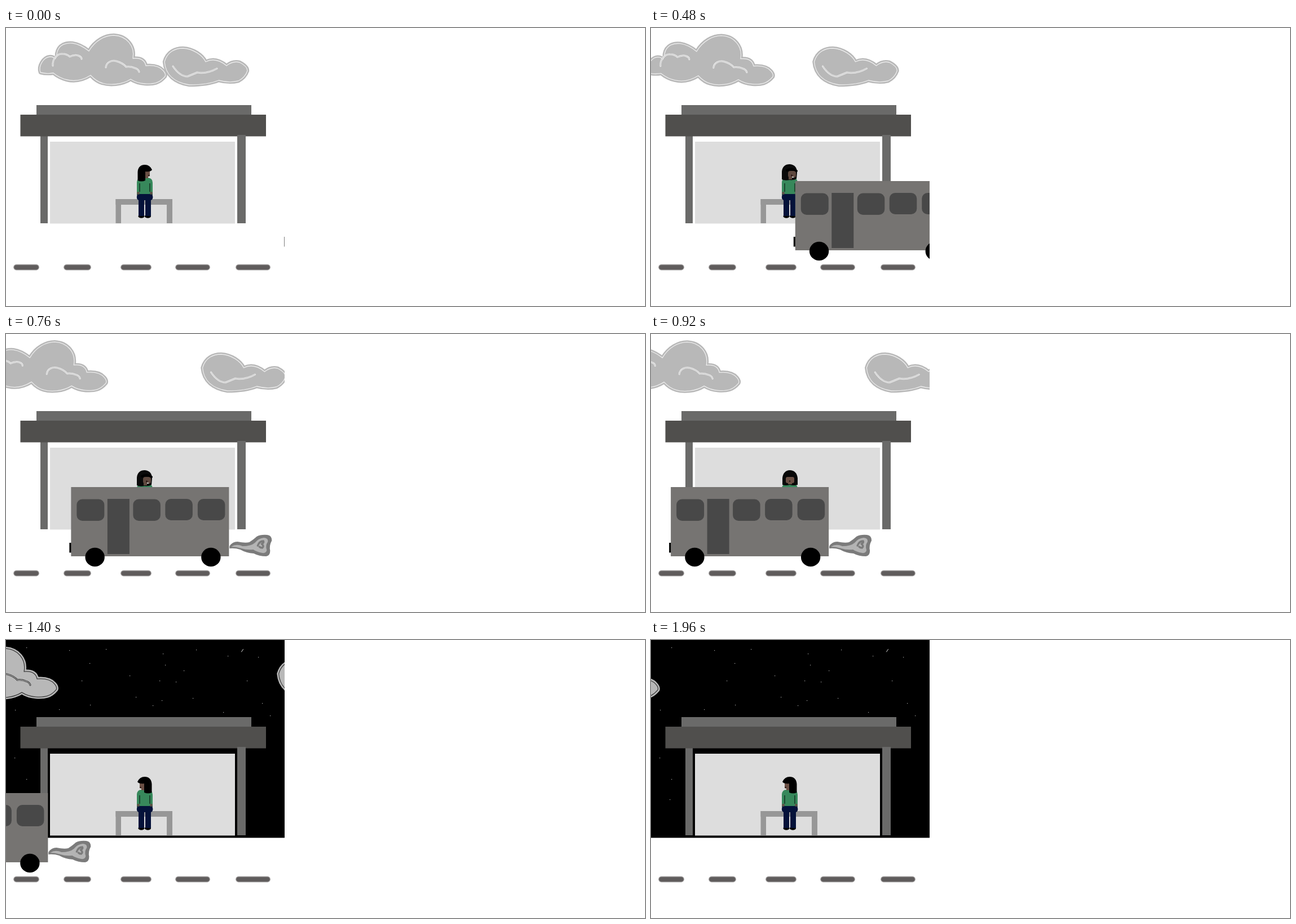
These frames come from a looping animation (1133 px wide and 494 px high, 2 s). An HTML page with a canvas:

```html
<!DOCTYPE html>
<html lang="en">
<head>
<meta charset="utf-8">
<title>Waiting at the bus stop</title>
<style>
html, body { margin: 0; width: 100%; height: 100%; overflow: hidden; background: #fff; }
canvas { display: block; width: 1133px; height: 494px; }
</style>
</head>
<body>
<canvas id="stage" width="1133" height="494"></canvas>
<script>
const ctx = document.getElementById('stage').getContext('2d');
const LOOP = 2000, STEP = 40, SCENE = 494;
const TURN = 440, NIGHT = 1320;

const path = d => new Path2D(d);

const cloudLeft = {
  edge: path('M61 79C57 68 66 52 78 51Q84 51 87 55Q91 50 90 46C93 28 108 26 118 27Q132 29 147 41C158 22 176 13 191 13C214 14 229 32 225 54Q245 52 248 67Q270 65 279 76Q284 82 282 86C272 98 262 100 246 99Q232 98 221 91C205 101 184 102 171 98Q160 95 150 84C134 94 120 95 108 92Q95 89 84 80Q72 82 61 79Z'),
  folds: path('M83 67C82 55 91 45 100 46Q108 46 113 51Q121 47 128 49Q134 51 134 55M177 70C178 60 188 57 196 59Q207 62 213 69Q221 68 228 71Q235 73 236 78')
};
const cloudRight = {
  edge: path('M281 60C286 42 300 36 314 36C332 37 348 48 354 60Q372 51 391 67Q402 58 414 61Q428 68 428 76Q424 88 412 94Q396 98 377 93Q358 101 325 101C300 97 283 84 281 60Z'),
  folds: path('M296 68Q308 86 322 86Q332 82 339 79Q356 82 374 72')
};

// Exhaust, relative to the left side of the bus
const smoke = {
  outer: path('M281 377Q286 369 295 369Q309 372 316 370Q325 364 329 360Q336 356 348 357Q356 358 356 367Q351 376 353 385Q353 394 346 395Q333 395 324 390Q310 389 300 383Q291 380 281 381Z'),
  inner: path('M284 378Q293 372 304 377Q319 377 326 371Q332 363 342 362Q350 363 349 369Q344 376 347 384Q346 390 339 389Q329 387 323 383Q311 384 302 381Q293 378 284 378Z'),
  curl: path('M331 376Q334 368 341 368Q342 371 338 373Q343 377 339 380Q336 380 334 378')
};

const body = {
  shirt: path('M232 297V274Q233 266 240 266H252Q260 267 260 275V297Z'),
  pants: path('M233 295H259Q261 300 260 303Q259 306 257 306V334H247V306H245V334H235V306Q231 304 232 299Z'),
  hair: path('M233.5 271V256C234 247 239 243 246 243Q255 243 259 252Q256 256 247 255V271Q240 274 233.5 271Z'),
  hairTurn: path('M232 269V255C233 246 238 242 246 242C255 243 259 248 259 257L258 268Q253 271 246 270Q237 272 232 269Z'),
  hairFront: path('M233 268V256C234 247 239 242 246 242C254 242 259 247 260 256V268Q253 270 246 268Q239 270 233 268Z')
};

const stars = [36,13, 112,18, 177,16, 148,41, 134,72, 219,63, 149,115, 94,123, 16,124, 230,101,
  260,116, 276,107, 272,72, 301,74, 282,44, 278,24, 337,17, 315,54, 331,103, 393,28,
  447,30, 427,72, 454,112, 468,134, 385,128, 15,209, 36,247, 33,283];
const dashes = [[13, 59], [102, 151], [203, 258], [300, 362], [407, 469]];

function fill(shape, color) {
  ctx.fillStyle = color;
  ctx.fill(shape);
}

function stroke(shape, color, width) {
  ctx.strokeStyle = color;
  ctx.lineWidth = width;
  ctx.stroke(shape);
}

function box(x0, y0, x1, y1, color, radius = 0) {
  ctx.fillStyle = color;
  ctx.beginPath();
  ctx.roundRect(x0, y0, x1 - x0, y1 - y0, radius);
  ctx.fill();
}

function oval(x, y, rx, ry, color) {
  ctx.fillStyle = color;
  ctx.beginPath();
  ctx.ellipse(x, y, rx, ry, 0, 0, Math.PI * 2);
  ctx.fill();
}

function at(x, y, draw) {
  ctx.save();
  ctx.translate(x, y);
  draw();
  ctx.restore();
}

function drawSky() {
  box(0, 0, SCENE, 351.5, '#000');
  ctx.fillStyle = '#aaa';
  for (let i = 0; i < stars.length; i += 2) ctx.fillRect(stars[i], stars[i + 1], 1.2, 1.2);
  stroke(path('M417.5 21L420.5 16.5'), '#ddd', 1);
}

function drawCloud(cloud, line) {
  stroke(cloud.edge, '#b8b8b8', 6.5);
  fill(cloud.edge, '#b8b8b8');
  stroke(cloud.edge, line, 1.3);
  stroke(cloud.folds, line, 3);
  stroke(cloud.folds, '#c4c4c4', 1);
}

function drawShelter() {
  box(61, 190, 74, 347, '#6a6a69');
  box(54, 137, 435, 154, '#6a6a69');
  box(25.5, 154, 461, 192.5, '#504f4d');
  box(410, 190, 425, 347, '#6a6a69');
  box(78, 202, 406, 347.5, '#ddd');
  box(194.5, 304, 295, 314, '#979797');
  box(194.5, 304, 204, 347, '#979797');
  box(285, 304, 295, 347, '#979797');
}

function sideHead() {
  box(245, 253, 255, 264, '#6b5045', 2);
  box(245, 260, 252, 267, '#6b5045');
  fill(body.hair, '#000');
  box(252, 261, 255, 262.5, '#251815');
}

function turnedHead() {
  fill(body.hairTurn, '#0a0a0a');
  box(243, 254, 257, 266, '#5f493f', 4);
  box(244, 264, 250, 269, '#5f493f');
  stroke(path('M241 253Q250 248 258 254'), '#000', 4);
  oval(249.5, 262, 1.2, 1.8, '#211');
  box(250, 264, 253, 266, '#ddd', 1);
}

function frontHead() {
  fill(body.hairFront, '#080808');
  box(239, 254, 254, 265, '#6b5045', 3);
  box(243, 264, 250, 267, '#6b5045');
  oval(246, 261.5, 1.3, 1.3, '#251815');
}

function drawWoman(pose) {
  oval(240, 334.5, 5.5, 3.2, '#000');
  oval(251.5, 334.5, 5.5, 3.2, '#000');
  fill(body.shirt, '#37885b');
  fill(body.pants, '#04123a');
  oval(234.5, 293.5, 2.5, 2.5, '#5d5347');
  oval(257.5, 293.5, 2.5, 2.5, '#5d5347');
  box(236.4, 276, 237.6, 291, '#0a1c13');
  box(254.4, 276, 255.6, 291, '#0a1c13');
  if (pose === 0) sideHead();
  else if (pose === 1) turnedHead();
  else if (pose === 2) frontHead();
  else {
    ctx.save();
    ctx.translate(492, 0);
    ctx.scale(-1, 1);
    sideHead();
    ctx.restore();
  }
}

function drawBus() {
  const glass = '#484848';
  fill(smoke.outer, '#7b7b7b');
  fill(smoke.inner, '#b4b4b4');
  stroke(smoke.curl, '#7b7b7b', 3.5);
  box(-3, 371, 1, 388.5, '#000');
  box(0, 272, 280, 395, '#767472');
  box(10, 293.5, 59, 332, glass, 10);
  box(64.5, 293, 103.5, 391, glass);
  box(110, 293.5, 158.5, 332, glass, 10);
  box(167, 293, 215.5, 331, glass, 10);
  box(224.5, 293, 273, 331, glass, 10);
  oval(42.3, 396.5, 17.2, 16.7, '#000');
  oval(248, 396.5, 17.2, 16.7, '#000');
}

function drawRoad() {
  const layers = [[11, '#bcbaba'], [9.6, '#858282'], [7.6, '#5f5c5c']];
  for (const [a, b] of dashes) {
    for (const [w, color] of layers) {
      box(a + 5.5 - w / 2, 425.2 - w / 2, b - 5.5 + w / 2, 425.2 + w / 2, color, w / 2);
    }
  }
}

function draw(t) {
  const night = t >= NIGHT;
  const line = night ? '#3c3c3c' : '#ececec';
  const pose = Math.min(3, Math.floor(t / TURN));

  ctx.fillStyle = '#fff';
  ctx.fillRect(0, 0, 1133, 494);
  ctx.save();
  ctx.beginPath();
  ctx.rect(0, 0, SCENE, SCENE);
  ctx.clip();
  ctx.lineCap = ctx.lineJoin = 'round';

  if (night) drawSky();
  at(-0.1378 * t, 0.0015 * t, () => drawCloud(cloudLeft, line));
  at(0.211 * Math.max(0, t - TURN), 0, () => drawCloud(cloudRight, line));
  drawShelter();
  drawWoman(pose);
  drawRoad();
  at(496.5 - 0.5015 * t, 0, drawBus);
  ctx.restore();
}

const start = performance.now();
function tick() {
  const t = (performance.now() - start) % LOOP;
  draw(Math.floor(t / STEP) * STEP);
  requestAnimationFrame(tick);
}
tick();
</script>
</body>
</html>
```
